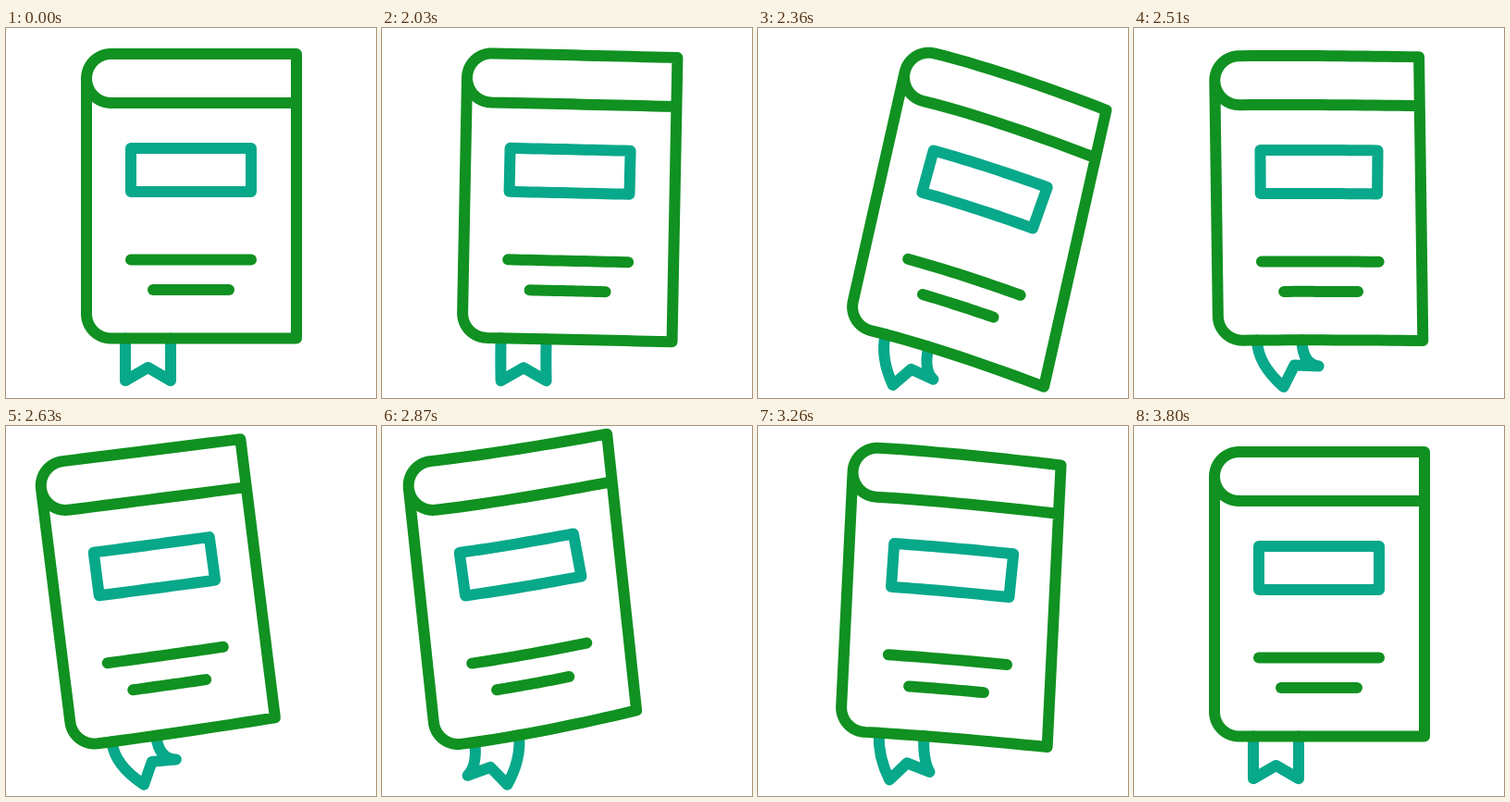
Write an HTML page with a canvas that moves like this. It is 400 px wide and 400 px high and loops after 3830 ms.

```html
<!DOCTYPE html>
<html>
<head>
<meta charset="utf-8">
<style>
  html, body { margin: 0; width: 100%; height: 100%; overflow: hidden; background: #fff; }
  canvas { display: block; width: 400px; height: 400px; }
</style>
</head>
<body>
<canvas id="stage" width="400" height="400"></canvas>
<script>
const LOOP = 3830, START = 2030, STEP = 30;
const GREEN = '#109121', TEAL = '#08a88a';
const RAD = Math.PI / 180;
const ctx = document.getElementById('stage').getContext('2d');

// Centre of the lower left corner, the book's anchor, and the cover's width from there
const AX = 113.5, AY = 309, R = 26.5, WIDTH = 200.5;

// time, anchor x, anchor y, tilt, bend at top, bend at bottom, width scale, ribbon angle
const KEYS = [
  [2000, 113.5, 309, 0, 0, 0, 1, 0],
  [2030, 113.6, 308.4, 1.1, .8, .5, 1, 0],
  [2300, 132, 300.5, 13.8, 18, 18, .975, 12],
  [2360, 128.6, 301.5, 12.7, 19, 18, .973, -8],
  [2540, 114, 313, -3.2, 1, 0, .97, -34],
  [2630, 95.7, 317, -7.1, 0, -4, .967, -38],
  [2750, 82, 319, -8.6, -5, -11, .963, -10],
  [2870, 82.2, 317.5, -6.1, -9, -16, .962, 13],
  [3260, 116.6, 304.4, 2.8, 9, 6.5, .987, -11],
  [3450, 108, 311, -.7, -2, -2, .995, 5],
  [3640, 113.5, 309, 0, 0, 0, 1, 0]
];

// Smooth slope through a key, flat at turning points
function slope(i, c) {
  const a = KEYS[i - 1], k = KEYS[i], b = KEYS[i + 1];
  if (!a || !b || (k[c] - a[c]) * (b[c] - k[c]) <= 0) return 0;
  return (b[c] - a[c]) / (b[0] - a[0]);
}

function poseAt(t) {
  const last = KEYS.length - 1;
  if (t <= KEYS[0][0] || t >= KEYS[last][0]) return KEYS[0];
  const i = KEYS.findIndex(k => k[0] > t) - 1;
  const a = KEYS[i], b = KEYS[i + 1], d = b[0] - a[0], s = (t - a[0]) / d;
  const h = s * s * (3 - 2 * s);
  return a.map((v, c) => v + (b[c] - v) * h +
    d * s * (1 - s) * ((1 - s) * slope(i, c) - s * slope(i + 1, c)));
}

function turn(x, y, angle) {
  const c = Math.cos(angle), s = Math.sin(angle);
  return [x * c - y * s, x * s + y * c];
}

// Maps a point of the resting book to the tilted, bent one
function bender([, ax, ay, tilt, top, bottom, scale]) {
  return ([x, y], midY = y) => {
    const dx = x - AX, u = Math.max(0, dx) / WIDTH;
    const bend = top + (bottom - top) * (midY - 28) / 307.5;
    const lean = Math.atan(1.5 * bend / WIDTH * Math.sqrt(u));
    const [nx, ny] = turn(0, y - midY, lean);
    const [px, py] = turn(dx * (1 - (1 - scale) * u) + nx,
      midY - AY + bend * u ** 1.5 + ny, tilt * RAD);
    return [ax + px, ay + py];
  };
}

function arc(cx, cy, from, to) {
  return Array.from({ length: 25 }, (_, i) => {
    const a = (from + (to - from) * i / 24) * RAD;
    return [cx + R * Math.cos(a), cy + R * Math.sin(a)];
  });
}

function line(points, map, color, closed) {
  ctx.beginPath();
  points.forEach((p, i) => {
    const q = points[i + 1] || p;
    for (let s = 0; s < 1; s += 1 / 16)
      ctx.lineTo(...map([p[0] + (q[0] - p[0]) * s, p[1] + (q[1] - p[1]) * s]));
  });
  if (closed) ctx.closePath();
  ctx.strokeStyle = color;
  ctx.stroke();
}

function ribbon(map, tilt, angle) {
  const mid = map([153.5, 335.5]);
  const half = 24.5 * (1 - .1 * Math.min(1, Math.abs(angle) / 8));
  const hang = (x, y) => {
    const [dx, dy] = turn(x, y, angle * RAD);
    return [mid[0] + dx, mid[1] + dy];
  };
  const left = map([129, 335.5]), right = map([178, 335.5]);
  const [kx, ky] = turn(0, 26, tilt * RAD);
  ctx.beginPath();
  ctx.moveTo(...left);
  ctx.quadraticCurveTo(left[0] + kx, left[1] + ky, ...hang(-half, 45.7));
  ctx.lineTo(...hang(0, 31.5));
  ctx.lineTo(...hang(half, 45.7));
  ctx.quadraticCurveTo(right[0] + kx, right[1] + ky, ...right);
  ctx.strokeStyle = TEAL;
  ctx.stroke();
}

const COVER = [[314, 81], ...arc(AX, 54.5, 90, 270), [314, 28], [314, 335.5],
  ...arc(AX, AY, 90, 180), [87, 54.5]];
const TITLE = [[135, 130], [265, 130], [265, 177], [135, 177], [135, 130]];

function draw(t) {
  const pose = poseAt(t), map = bender(pose);
  ctx.fillStyle = '#fff';
  ctx.fillRect(0, 0, 400, 400);
  ctx.lineWidth = 12;
  ctx.lineCap = ctx.lineJoin = 'round';
  ribbon(map, pose[3], pose[7]);
  line(TITLE, p => map(p, 153.5), TEAL, true);
  line(COVER, p => map(p), GREEN);
  line([[135, 250.5], [265, 250.5]], p => map(p), GREEN);
  line([[159, 283], [241, 283]], p => map(p), GREEN);
}

const begin = performance.now();
function frame() {
  const t = (performance.now() - begin) % LOOP;
  draw(START + STEP * Math.floor((t - START) / STEP));
  requestAnimationFrame(frame);
}
frame();
</script>
</body>
</html>
```
